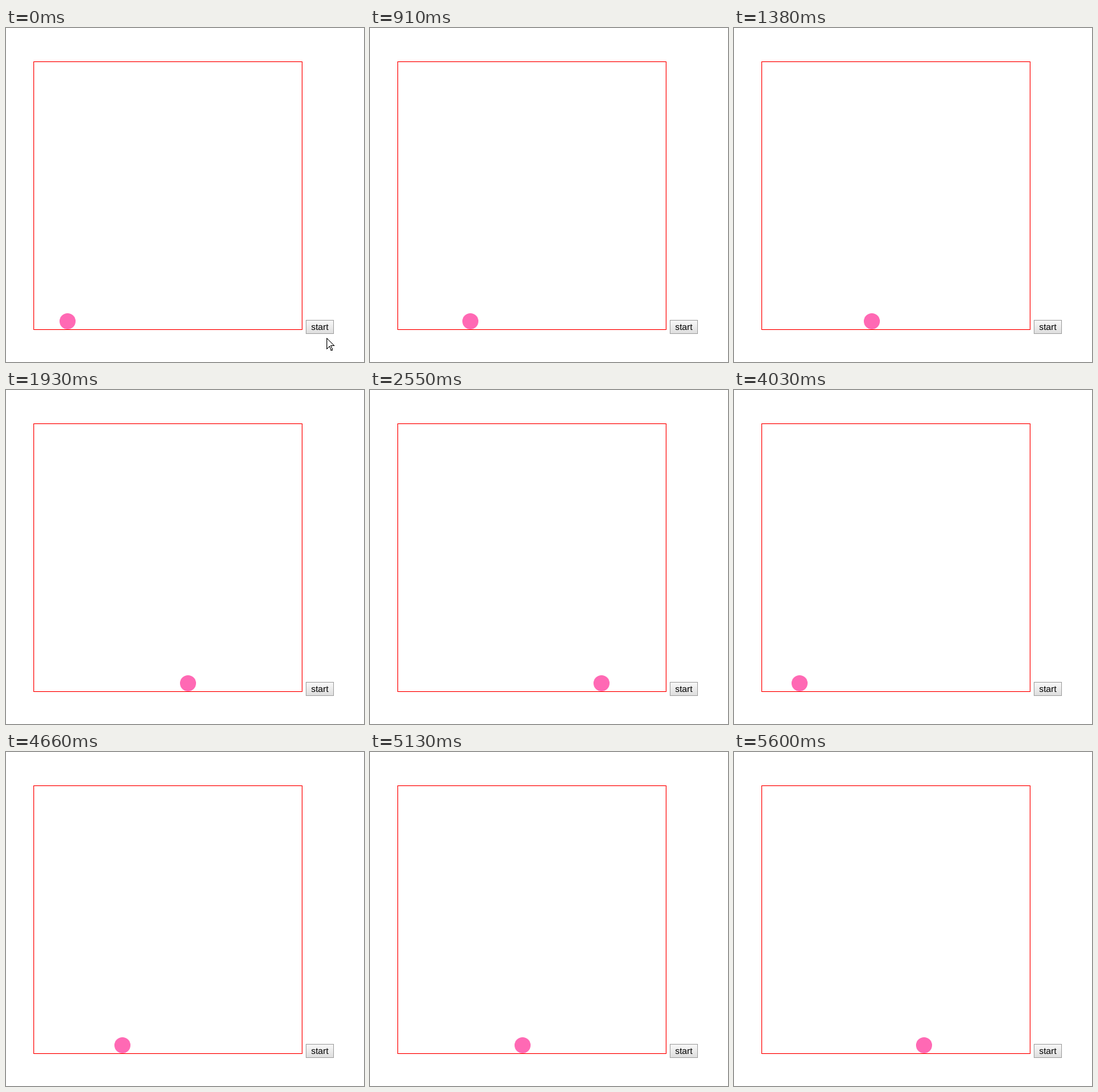
An HTML page that plays this animation: 535x500 px, repeating every 5680 ms.

```html
<!DOCTYPE html>
<html lang="en">
<head>
<meta charset="utf-8">
<title>Rolling ball</title>
<style>
  html, body { margin: 0; width: 100%; height: 100%; overflow: hidden; background: #fff; }
  svg { display: block; width: 535px; height: 500px; }
  text { font: 13.333px "Liberation Sans", Arial, sans-serif; text-rendering: geometricPrecision; }
  #button { fill: url(#face); stroke: #a6a6a6; }
  #button.hover { stroke: #8f8f8f; }
  #button.pressed { fill: #e2e2e2; stroke: #9a9a9a; }
</style>
</head>
<body>
<svg viewBox="0 0 535 500">
  <defs>
    <clipPath id="inside"><rect x="42" y="51" width="400" height="400"/></clipPath>
    <linearGradient id="face" x2="0" y2="1">
      <stop offset="0.2" stop-color="#f4f4f4"/>
      <stop offset="1" stop-color="#ddd"/>
    </linearGradient>
  </defs>
  <rect x="41.5" y="50.5" width="401" height="401" fill="none" stroke="#f00"/>
  <g clip-path="url(#inside)"><circle id="ball" cy="439" r="12" fill="#ff69b4"/></g>
  <rect id="button" x="448.5" y="437.5" width="41" height="20"/>
  <text x="456" y="452">start</text>
  <path id="cursor" d="M.5.5V16.5L4.5 12.5L7 18.5H8.5L9 17L6.5 12V11.5H11.5Z"
    fill="#fff" stroke="#000" shape-rendering="crispEdges"/>
</svg>
<script>
const LOOP = 5680, STEP = 78, CLICK = 442;    // ms
const START = 92, SPEED = 9.32;               // px, px per step
const EXIT = 454, WRAP = 425.1;               // px

const ball = document.getElementById("ball");
const button = document.getElementById("button");
const cursor = document.getElementById("cursor");
const clamp = v => Math.min(1, Math.max(0, v));

// Steps are counted from the click that sets the ball rolling.
function ballX(step) {
  if (step < 0) return START;
  const x = START + 3.88 + SPEED * step;
  return 2 * Math.floor((x > EXIT ? x - WRAP : x) / 2);
}

// Rise onto the button, leave to the right, later cut across the lower corner.
function cursorTip(step) {
  const corner = step - 39;
  if (corner >= 0) return [522 - 8 * corner, 477 + 12 * corner];
  const rise = clamp((step + 6) / 3);
  const leave = 4 * Math.max(0, step) ** 1.8;
  return [479 + 3 * rise + leave, 464 - 9 * rise].map(Math.round);
}

function render(time) {
  const step = Math.floor((time - CLICK) / STEP);
  const [x, y] = cursorTip(step);
  const hover = x < 490 && y < 458;
  ball.setAttribute("cx", ballX(step));
  cursor.setAttribute("transform", `translate(${x} ${y})`);
  button.setAttribute("class", !hover ? "" : step < 0 && step >= -3 ? "pressed" : "hover");
}

const start = performance.now();
function frame() {
  render((performance.now() - start) % LOOP);
  requestAnimationFrame(frame);
}
render(0);
requestAnimationFrame(frame);
</script>
</body>
</html>
```
